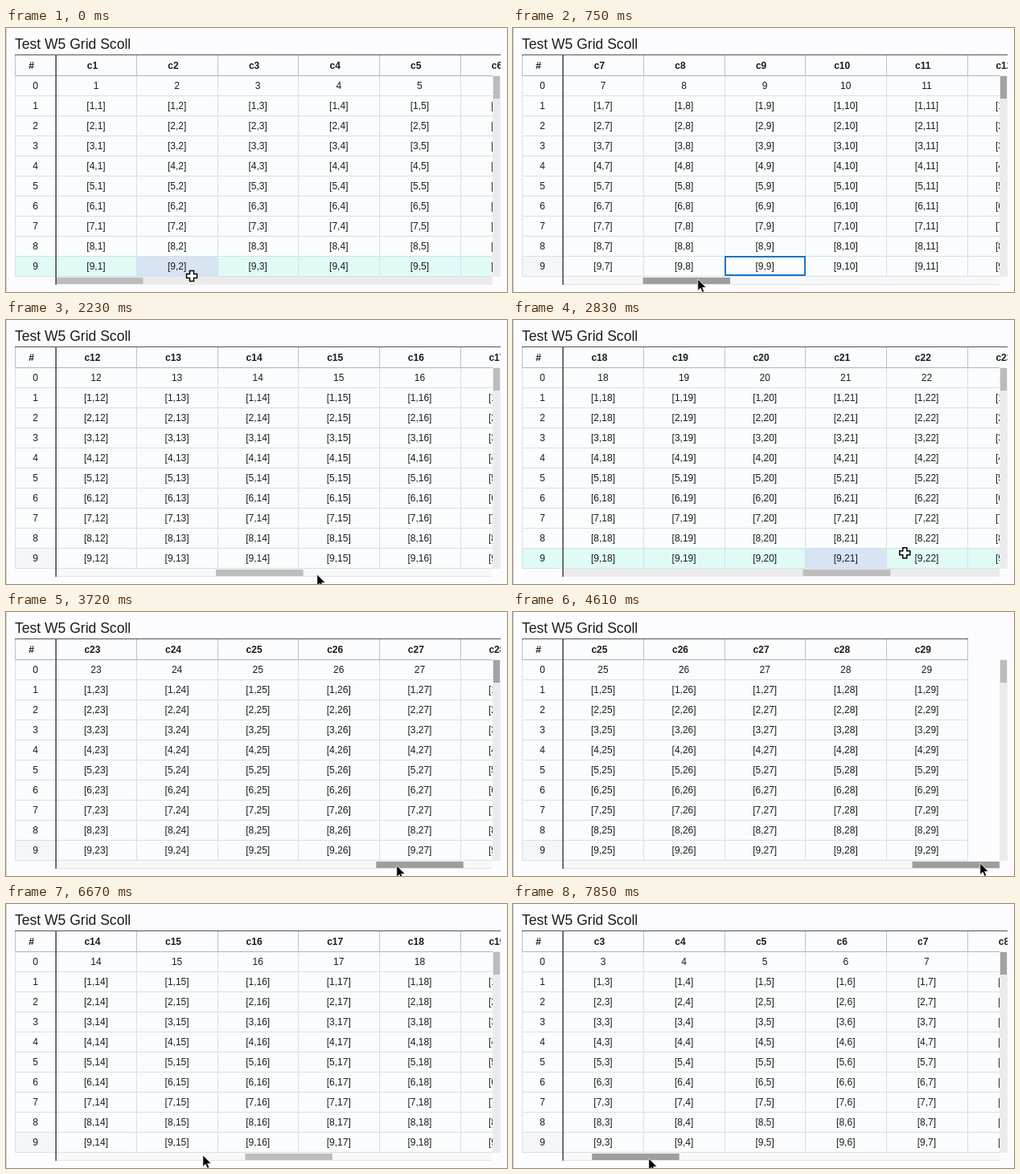
Animation, 623 px wide and 329 px high, one loop 8000 ms. Source, as an HTML page:

```html
<!DOCTYPE html>
<html lang="en">
<head>
<meta charset="utf-8">
<title>Grid scroll</title>
<style>
  html, body { margin: 0; width: 100%; height: 100%; overflow: hidden; background: #fcfcfe; }
  svg { display: block; width: 623px; height: 329px; cursor: default; }
  text { font: 12px "Liberation Sans", Arial, sans-serif; fill: #1c1c1c; text-anchor: middle; }
  .title { font-size: 17.55px; text-anchor: start; }
  .head { font-weight: bold; }
</style>
</head>
<body>
<svg id="stage" viewBox="0 0 623 329">
  <defs>
    <clipPath id="headClip"><rect x="11" y="30" width="604" height="30"/></clipPath>
    <clipPath id="bodyClip"><rect x="11" y="59" width="595" height="252"/></clipPath>
  </defs>
</svg>
<script>
const LOOP = 8000, TICK = LOOP / 54;
const COLS = 29, ROWS = 10, VISIBLE = 5, SLOTS = VISIBLE + 1;
const PAGE = 5.5, LAST_PAGE = COLS - VISIBLE;
const LEFT = 62, RIGHT = 605, PITCH = 100.6;
const THUMB = 108.5, THUMB_STEP = (RIGHT - LEFT - THUMB) / LAST_PAGE;
const PICKED = 9;

// Each click on the track pages the grid by PAGE columns.
const FORWARD = [750, 1490, 2530, 3720, 4460];
const BACK = [5790, 6370, 6970, 7850];

const HOME = { x: 231, y: 309 };
const GLIDES = [
  { from: 0, to: 140, x: 231, y: 313 },
  { from: 750, to: 1190, x: 330, y: 315 },
  { from: 1490, to: 2230, x: 388, y: 317 },
  { from: 2530, to: 2830, x: 488, y: 290 },
  { from: 2830, to: 3270, x: 487, y: 316 },
  { from: 3720, to: 4310, x: 582, y: 313 },
  { from: 4900, to: 5340, x: 329, y: 314 },
  { from: 6370, to: 6670, x: 246, y: 313 },
  { from: 6970, to: 7550, x: 170, y: 317 }
];

const stage = document.getElementById("stage");
const colLeft = i => LEFT + Math.floor(i * PITCH);
const rowTop = r => 59 + r * 25;
const lastRow = rowTop(ROWS - 1) + 1;

function set(node, attrs) {
  for (const key in attrs) node.setAttribute(key, attrs[key]);
}
function add(parent, tag, attrs, content = "") {
  const node = document.createElementNS("http://www.w3.org/2000/svg", tag);
  set(node, attrs);
  node.textContent = content;
  return parent.appendChild(node);
}
const box = (parent, x, y, width, height, fill) =>
  add(parent, "rect", { x, y, width, height, fill });
const label = (parent, x, y, content, cls = "") =>
  add(parent, "text", { x, y, class: cls }, content);
const show = (node, on) => set(node, { visibility: on ? "visible" : "hidden" });

box(stage, 0, 0, 1, 329, "#cfcfd2");
label(stage, 11, 26, "Test W5 Grid Scoll", "title");

const head = add(stage, "g", { "clip-path": "url(#headClip)" });
const body = add(stage, "g", { "clip-path": "url(#bodyClip)" });

const wide = [box(head, 11, 33, 604, 27, "#fafcfe"), box(body, 11, 60, 604, 250, "#fafcfd")];
const lastLabel = box(body, 12, lastRow, 50, 24, "#f5f6f8");
const hoverRow = box(body, 12, lastRow, 594, 24, "#e0faf6");
const hoverCell = box(body, 0, lastRow, 100, 24, "#d8e3f3");

wide.push(box(head, 11, 33, 604, 1, "#505356"), box(head, 11, 59, 604, 1, "#aab4be"));
for (let r = 0; r < ROWS; r++) {
  wide.push(box(body, 11, rowTop(r + 1), 604, 1, "#d2e1ec"));
  label(body, 36.5, rowTop(r) + 17, r);
}
label(head, 31.5, 51, "#", "head");

const columns = Array.from({ length: SLOTS }, (_, i) => {
  const line = i ? colLeft(i) : 11;
  const mid = 112 + i * PITCH;
  box(head, line, 34, 1, 26, "#b9c1c9");
  box(body, line, 60, 1, 250, "#d2e1ec");
  return {
    head: label(head, mid - 4.6, 51, "", "head"),
    cells: Array.from({ length: ROWS }, (_, r) => label(body, mid, rowTop(r) + 17))
  };
});

const selection = add(body, "rect", {
  y: lastRow, width: 99, height: 23, fill: "none", stroke: "#1b75c4", "stroke-width": 2
});

box(stage, RIGHT, 59, 10, 251, "#ebebeb");
const vThumb = box(stage, 606, 60, 8, 28, "#bbb");
const hTrack = box(stage, LEFT, 310, RIGHT - LEFT, 10, "#ebebeb");
const hLine = box(stage, LEFT, 319, RIGHT - LEFT, 1, "#e0e2e5");
const hThumb = box(stage, LEFT, 311, THUMB, 8, "#bdbdbd");
box(stage, 61.3, 33, 1.7, 287, "#55585c");

const plus = add(stage, "path", {
  d: "M-2.5-6.5h5v4h4v5h-4v4h-5v-4h-4v-5h4z",
  fill: "#fff", stroke: "#000", "stroke-width": 1.5
});
const arrow = add(stage, "path", {
  d: "M-1.2 0v14.5l3.4-3.2l2.2 5.1l2.4-1l-2.2-5h4.6z",
  fill: "#000", stroke: "#fff", "stroke-width": 0.8
});

function fillColumns(first) {
  columns.forEach((col, i) => {
    const n = first + i, real = n <= COLS;
    col.head.textContent = real ? "c" + n : "";
    col.cells.forEach((cell, r) => {
      cell.textContent = !real ? "" : r ? `[${r},${n}]` : n;
    });
  });
  const right = Math.min(615, colLeft(COLS - first + 1) + 1);
  for (const node of wide) set(node, { width: right - 11 });

  const slot = PICKED - first;
  show(selection, slot >= 0 && slot < SLOTS);
  set(selection, { x: colLeft(slot) + 1 });
}

function scrollAt(t) {
  const past = times => times.filter(time => time <= t);
  const on = past(FORWARD), back = past(BACK);
  return {
    pos: Math.min(on.length * PAGE, LAST_PAGE) - back.length * PAGE,
    age: t - Math.max(...on, ...back)
  };
}

// The pointer moves in whole ticks.
function pointerAt(t) {
  const now = Math.floor(t / TICK) * TICK;
  let { x, y } = HOME;
  for (const glide of GLIDES) {
    const p = Math.min(1, Math.max(0, (now - glide.from) / (glide.to - glide.from)));
    const k = p * p * (3 - 2 * p);
    x += (glide.x - x) * k;
    y += (glide.y - y) * k;
  }
  return { x, y };
}

let shown = 0;

function draw(t) {
  const { pos, age } = scrollAt(t);
  const { x, y } = pointerAt(t);
  const first = 1 + Math.ceil(pos);
  const thumbX = LEFT + pos * THUMB_STEP;
  const overGrid = y < 310;
  const overThumb = !overGrid && x >= thumbX && x <= thumbX + THUMB;

  if (first !== shown) fillColumns(shown = first);
  set(hThumb, { x: thumbX, fill: overThumb ? "#9e9e9e" : "#bdbdbd" });
  set(hTrack, { fill: overGrid ? "#ebebeb" : "#f8f8f9" });
  set(vThumb, { fill: age < TICK ? "#a3a3a3" : "#bbb" });

  // The highlight lags one tick behind the pointer.
  const hovered = Math.floor((pointerAt(Math.max(0, t - TICK)).x - LEFT) / PITCH);
  set(hoverCell, { x: colLeft(hovered) + 1 });

  for (const node of [hoverRow, hoverCell, plus]) show(node, overGrid);
  for (const node of [lastLabel, hLine, arrow]) show(node, !overGrid);
  set(overGrid ? plus : arrow, { transform: `translate(${x} ${y})` });
}

const start = performance.now();
function tick() {
  draw((performance.now() - start) % LOOP);
  requestAnimationFrame(tick);
}
tick();
</script>
</body>
</html>
```
